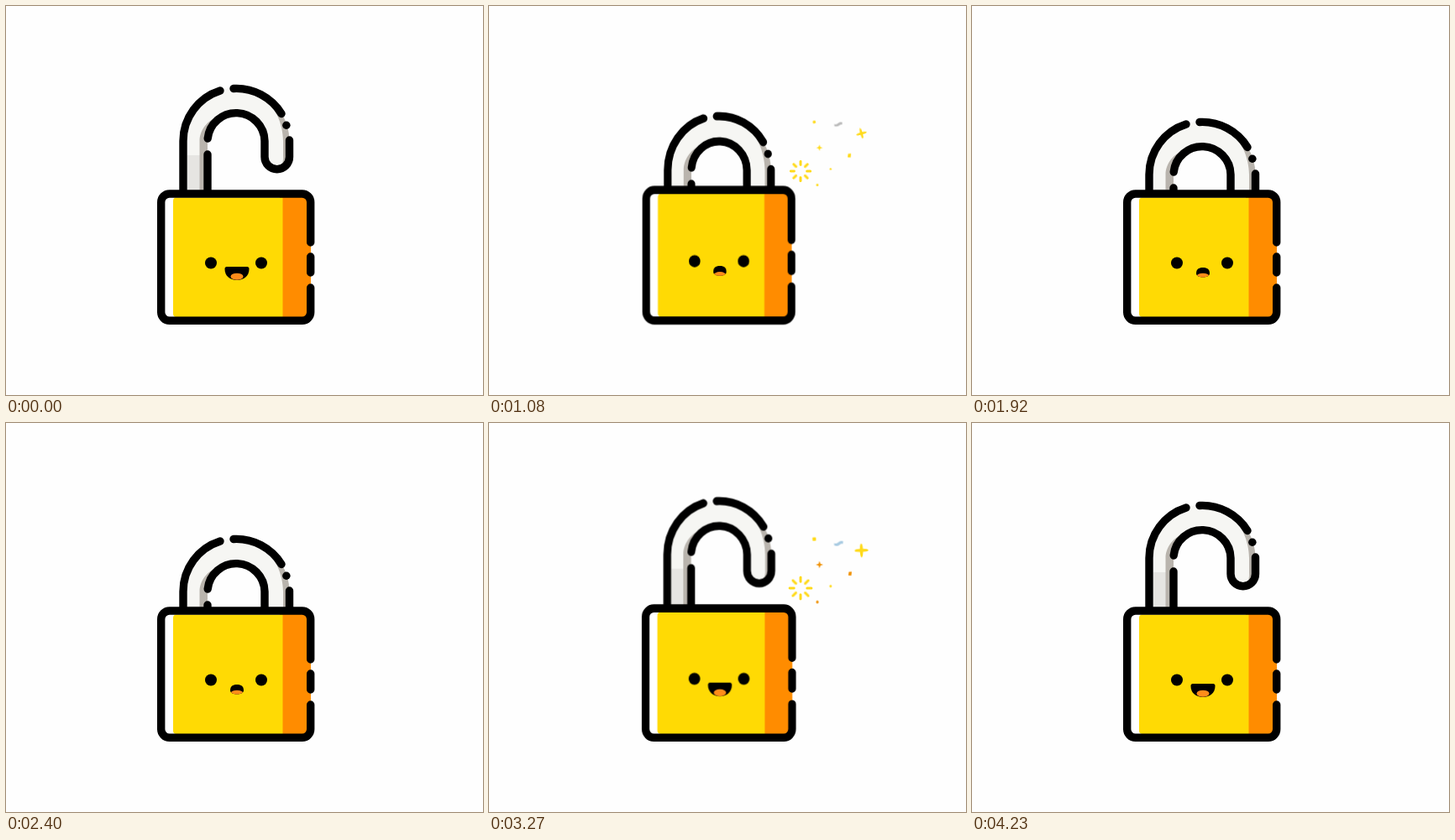
An HTML page that plays this animation: 568x464 px, repeating every 4.26 s.

```html
<!DOCTYPE html>
<html lang="en">
<head>
<meta charset="utf-8">
<title>Padlock</title>
<style>
  html, body { margin: 0; width: 100%; height: 100%; overflow: hidden; background: #fefefe; }
  svg { display: block; width: 568px; height: 464px; }

  .line { fill: none; stroke: #000; stroke-width: 9.4; stroke-linecap: round; stroke-linejoin: round; }

  .lock, .shackle, .mouth { animation: 4260ms linear infinite; }
  .lock { transform-origin: 273.5px 380px; animation-name: squash; animation-timing-function: ease-in-out; }
  .shackle { animation-name: slide; }
  .mouth { animation-name: mood; }
  .eye { transform-box: fill-box; transform-origin: center; animation: blink 2130ms linear infinite; }

  @keyframes squash {
    0%, 18.3% { transform: scale(1); }
    20.9% { transform: scale(1.064, .94); }
    26.4% { transform: scale(.965, 1.036); }
    31% { transform: scale(1.01, .985); }
    35.2% { transform: scale(1.004, .993); }
    39.4% { transform: scale(.997, 1.003); }
    42.3%, 70.4% { transform: scale(1); }
    72.5% { transform: scale(1.035, .965); }
    76.8% { transform: scale(.98, 1.019); }
    79.8% { transform: scale(1.03, .973); }
    83.8% { transform: scale(.99, 1.007); }
    86.9% { transform: scale(1.005, .996); }
    89.4% { transform: scale(.993, 1.006); }
    93%, 100% { transform: scale(1); }
  }
  @keyframes slide {
    0%, 11.3% { transform: translateY(0); }
    13.4% { transform: translateY(5px); }
    15.5% { transform: translateY(12px); }
    18.3% { transform: translateY(32px); }
    19.7%, 62% { transform: translateY(40px); }
    64.1% { transform: translateY(30px); }
    65.5% { transform: translateY(10px); }
    68.3% { transform: translateY(-25px); }
    69% { transform: translateY(-25px); }
    70.42% { transform: translateY(-18px); }
    73.9%, 100% { transform: translateY(0); }
  }
  @keyframes blink {
    0%, 38% { transform: scaleY(1); }
    40.4%, 41.3% { transform: scaleY(.07); }
    43.7%, 100% { transform: scaleY(1); }
  }
  @keyframes mood {
    0%, 18.3%, 74.65%, 100% {
      d: path("M260.5 314C260.5 311 262 311 264 311C270 311 280 311 286 311C288 311 289.5 311 289.5 314C289.5 322 283 327 275 327C267 327 260.5 322 260.5 314Z");
    }
    24.65%, 66.9% {
      d: path("M267 319C267 316 268 314 270 313C272 311.5 278 311.5 280 313C282 314 283 316 283 319C283 322 279 323.5 275 323.5C271 323.5 267 322 267 319Z");
    }
  }

  /* sparkles burst twice per loop */
  .spoke { fill: none; stroke: #ffda1a; stroke-width: 3; stroke-linecap: round; animation: ray 2130ms linear infinite; }
  .early, .late { animation: early 2130ms linear infinite; }
  .late { animation-name: late; }
  .warm, .cool { fill: #ffda1a; animation: warm 4260ms linear infinite; }
  .cool { fill: #bbb; animation-name: cool; }
  .gold { fill: #ffda1a; }

  @keyframes ray {
    0%, 29.6% { d: path("M7 0H7.3"); opacity: 0; }
    31% { d: path("M7 0H7.3"); opacity: .35; }
    34% { d: path("M7 0H7.3"); opacity: 1; }
    41.5% { d: path("M7 0H7.4"); opacity: 1; }
    56% { d: path("M8 0H14"); opacity: 1; }
    67.6% { d: path("M8.5 0H14.5"); opacity: 1; }
    70.4% { d: path("M12.8 0H14.8"); opacity: 1; }
    74% { d: path("M15 0H15.1"); opacity: 1; }
    75%, 100% { d: path("M15 0H15.1"); opacity: 0; }
  }
  @keyframes early {
    0%, 29.6% { transform: translate(var(--x), var(--y)) scale(0); }
    31% { transform: translate(var(--x), var(--y)) scale(.3); }
    40.85% { transform: translate(var(--x), var(--y)) scale(var(--s)); }
    54%, 67.6% { transform: none; }
    70.4% { transform: rotate(var(--r, 0deg)) scale(.68); }
    84%, 100% { transform: rotate(var(--r, 0deg)) scale(0); }
  }
  @keyframes late {
    0%, 41.5% { transform: scale(0) rotate(-60deg); }
    54%, 67.6% { transform: none; }
    70.4% { transform: scale(.88) rotate(16deg); }
    86%, 100% { transform: scale(0) rotate(70deg); }
  }
  @keyframes warm {
    0%, 49.9% { fill: #ffda1a; }
    50%, 100% { fill: #f09208; }
  }
  @keyframes cool {
    0%, 71% { fill: #bbb; }
    76%, 94% { fill: #a9cbe2; }
    95%, 100% { fill: #bbb; }
  }
</style>
</head>
<body>
<svg viewBox="0 0 568 464">
  <defs>
    <clipPath id="lips"><path class="mouth"/></clipPath>
  </defs>

  <g class="lock">
    <g class="shackle">
      <path fill="#f6f6f3" d="M211 262V161A63 63 0 0 1 337.5 161V180A14.75 14.75 0 0 1 308 180V161A34 34 0 0 0 240 161V262Z"/>
      <path fill="#e6e5e2" d="M216 262V178H231V262Z"/>
      <path fill="#b9b4ad" d="M230.5 262V161C230.5 147 242 133 259 130L262 129A34 34 0 0 0 240 161V262Z"/>
      <path fill="#b9b4ad" d="M303 105A63 63 0 0 1 337.5 161V180Q337 192 326 194Q331 186 330 178V161C330 140 320 118 303 105Z"/>
      <g class="line">
        <path d="M211 262V161A63 63 0 0 1 255 101"/>
        <path d="M271 98.5A63 63 0 0 1 328 128.5"/>
        <path d="M333.8 142.2h.1"/>
        <path d="M337.5 160V180A14.75 14.75 0 0 1 308 180V161A34 34 0 0 0 240.2 158"/>
        <path d="M240 177V262"/>
      </g>
    </g>

    <rect x="184.7" y="224" width="178" height="151.3" rx="10" fill="#fff"/>
    <path fill="#ff8c00" d="M326 224H353Q363 224 363 234V365Q363 375 353 375H326Z"/>
    <path fill="#ffda04" d="M203 228.5H329.5V371H203Q199 371 199 367V232.5Q199 228.5 203 228.5Z"/>
    <path class="line" d="M362.7 282V234A10 10 0 0 0 352.7 224H194.7A10 10 0 0 0 184.7 234V365.3A10 10 0 0 0 194.7 375.3H352.7A10 10 0 0 0 362.7 365.3V336M362.7 299V318"/>

    <circle class="eye" cx="244" cy="306.5" r="7"/>
    <circle class="eye" cx="304" cy="306.5" r="7"/>
    <path class="mouth"/>
    <ellipse cx="275" cy="322.7" rx="7.5" ry="4" fill="#ff8c1a" clip-path="url(#lips)"/>
  </g>

  <g transform="translate(371 197)">
    <path class="spoke"/>
    <path class="spoke" transform="rotate(45)"/>
    <path class="spoke" transform="rotate(90)"/>
    <path class="spoke" transform="rotate(135)"/>
    <path class="spoke" transform="rotate(180)"/>
    <path class="spoke" transform="rotate(225)"/>
    <path class="spoke" transform="rotate(270)"/>
    <path class="spoke" transform="rotate(315)"/>
  </g>

  <g transform="translate(443.5 152)"><g class="late">
    <path class="gold" d="M0 -8.5Q1.6 -8.5 1.9 -1.9Q8.5 -1.6 8.5 0Q8.5 1.6 1.9 1.9Q1.6 8.5 0 8.5Q-1.6 8.5 -1.9 1.9Q-8.5 1.6 -8.5 0Q-8.5 -1.6 -1.9 -1.9Q-1.6 -8.5 0 -8.5Z"/>
  </g></g>
  <g transform="translate(416.5 144)"><g class="early" style="--x:-2px;--y:-12px;--s:.5;--r:-32deg">
    <path class="cool" d="M-5.5 -.5Q-3 1 -1 -1Q2 -4 5.5 -2.5L5 .5Q3 0 1 1.8Q-2 4 -5.5 2.3Z"/>
  </g></g>
  <g transform="translate(430 180)"><g class="early" style="--x:-3.5px;--y:-6px;--s:1.05;--r:20deg">
    <path class="warm" d="M-1.5 -2.2L2 -2.4L1.5 2.3L-2 2Z"/>
  </g></g>
  <g transform="translate(393.5 169)"><g class="early" style="--x:0px;--y:0px;--s:.35">
    <path class="warm" d="M0 -4.5L1.2 -1.2L4.5 0L1.2 1.2L0 4.5L-1.2 1.2L-4.5 0L-1.2 -1.2Z"/>
  </g></g>
  <g transform="translate(391 213.5)"><g class="early" style="--x:0px;--y:0px;--s:.4">
    <circle class="warm" r="1.7"/>
  </g></g>
  <g transform="translate(406.8 194.5)"><g class="late"><circle class="gold" r="1.6"/></g></g>
  <g transform="translate(387.3 138.5)"><g class="late"><rect class="gold" x="-2.2" y="-2.2" width="4.4" height="4.4" rx="1"/></g></g>
</svg>
</body>
</html>
```
